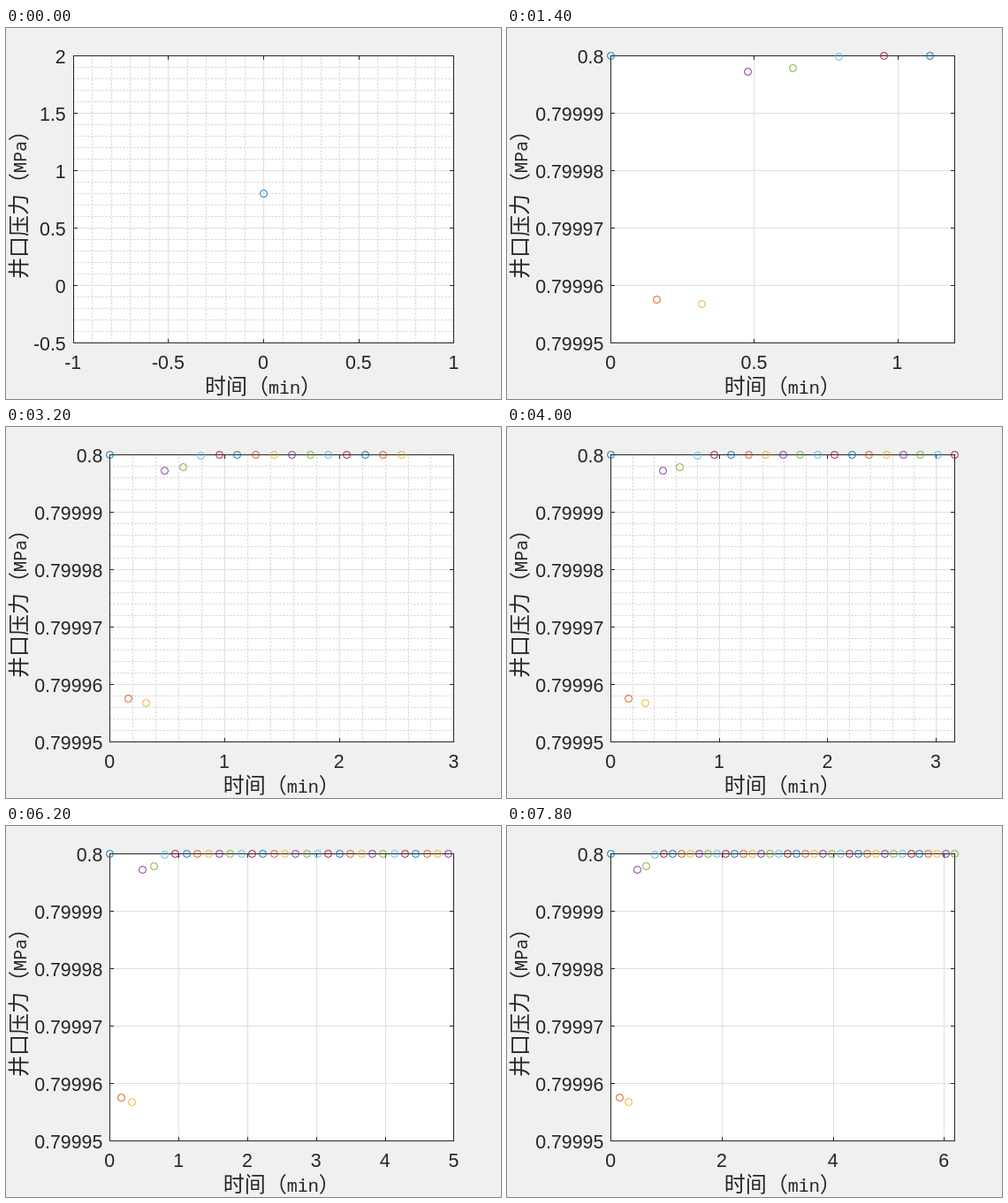
Recreate the animation shown at these times as an HTML page with a canvas. Size 560x420 px, loop 8000 ms.

```html
<!DOCTYPE html>
<html lang="zh-CN">
<head>
<meta charset="utf-8">
<title>井口压力</title>
<style>
html, body { margin: 0; width: 100%; height: 100%; overflow: hidden; background: #f0f0f0; }
canvas { display: block; }
</style>
</head>
<body>
<canvas id="stage" width="560" height="420"></canvas>
<script>
const ctx = document.getElementById('stage').getContext('2d');
const STEP_MS = 200, POINTS = 40, DT = 0.1588;
const COLORS = ['#0072bd', '#d95319', '#edb120', '#7e2f8e', '#77ac30', '#4dbeee', '#a2142f'];
const NICE = [0.02, 0.05, 0.1, 0.2, 0.5, 1, 2];
// Pressure drop below 0.8 MPa, in units of 1e-5
const DROPS = [0, 4.245, 4.316, 0.281, 0.22, 0.022, 0.007];
const TOP = 31, BOTTOM = 356.4, RIGHT = 506.4, TICK = 4.5;
const INK = '#262626', MAJOR = '#dfdfdf', MINOR = '#cfcfcf';

const pressure = i => 0.8 - (DROPS[i] || 0) * 1e-5;
const crisp = v => Math.round(v) + 0.5;
const label = v => String(+v.toFixed(5));

// Round the limit up to a tick unless that leaves too much empty room
function timeAxis(max) {
  const intervals = step => Math.ceil(max / step - 1e-9);
  const k = NICE.findIndex(step => intervals(step) <= 5);
  const step = NICE[k], rounded = intervals(step) * step;
  let hi = max;
  if (max / rounded >= 0.8) hi = rounded;
  else if (intervals(NICE[k - 1]) === 6) hi = 6 * NICE[k - 1];
  return { lo: 0, hi, step };
}

function ticks({ lo, hi, step }) {
  const list = [];
  for (let k = Math.ceil(lo / step - 1e-6); k * step <= hi + step * 1e-6; k++) list.push(k * step);
  return list;
}

function minorTicks({ lo, hi, step }) {
  const lead = Math.round(step / 10 ** Math.floor(Math.log10(step) + 1e-9));
  return ticks({ lo, hi, step: step / (lead === 2 ? 4 : 5) });
}

function line(x1, y1, x2, y2, color, dash = []) {
  ctx.strokeStyle = color;
  ctx.setLineDash(dash);
  ctx.beginPath();
  ctx.moveTo(x1, y1);
  ctx.lineTo(x2, y2);
  ctx.stroke();
}

function axisTitle(name, unit, x, y, angle) {
  const cjk = '24px "Noto Sans CJK SC", "Noto Sans CJK", sans-serif';
  const parts = [[name + '（', cjk], [unit, '20px "Noto Sans Mono", monospace'], ['）', cjk]];
  const widths = parts.map(([text, font]) => {
    ctx.font = font;
    return ctx.measureText(text).width;
  });
  ctx.save();
  ctx.translate(x, y);
  ctx.rotate(angle);
  ctx.textAlign = 'left';
  let at = -widths.reduce((a, b) => a + b) / 2;
  parts.forEach(([text, font], i) => {
    ctx.font = font;
    ctx.fillText(text, at, 0);
    at += widths[i];
  });
  ctx.restore();
}

function draw(n) {
  const left = n ? 117.3 : 75.7;
  const xAxis = n ? timeAxis(n * DT) : { lo: -1, hi: 1, step: 0.5 };
  const yAxis = n ? { lo: 0.79995, hi: 0.8, step: 1e-5 } : { lo: -0.5, hi: 2, step: 0.5 };
  const px = v => left + (v - xAxis.lo) / (xAxis.hi - xAxis.lo) * (RIGHT - left);
  const py = v => BOTTOM - (v - yAxis.lo) / (yAxis.hi - yAxis.lo) * (BOTTOM - TOP);
  const x0 = crisp(left), x1 = crisp(RIGHT), y0 = crisp(TOP), y1 = crisp(BOTTOM);
  const xTicks = ticks(xAxis), yTicks = ticks(yAxis);

  ctx.fillStyle = '#f0f0f0';
  ctx.fillRect(0, 0, 560, 420);
  ctx.fillStyle = '#fff';
  ctx.fillRect(x0, y0, x1 - x0, y1 - y0);
  ctx.lineWidth = 1;

  const grid = (xs, ys, color, dash) => {
    xs.forEach(v => line(crisp(px(v)), y1, crisp(px(v)), y0, color, dash));
    ys.forEach(v => line(x0, crisp(py(v)), x1, crisp(py(v)), color, dash));
  };
  // The minor grid toggles with every added point
  if (n % 2 === 0) grid(minorTicks(xAxis), minorTicks(yAxis), MINOR, [2, 2]);
  grid(xTicks, yTicks, MAJOR);

  ctx.setLineDash([]);
  ctx.strokeStyle = ctx.fillStyle = INK;
  ctx.strokeRect(x0, y0, x1 - x0, y1 - y0);
  ctx.font = '21.33px "Liberation Sans", Arial, sans-serif';
  ctx.textAlign = 'center';
  for (const v of xTicks) {
    const x = crisp(px(v));
    line(x, y1, x, y1 - TICK, INK);
    line(x, y0, x, y0 + TICK, INK);
    ctx.fillText(label(v), px(v), 386);
  }
  ctx.textAlign = 'right';
  for (const v of yTicks) {
    const y = crisp(py(v));
    line(x0, y, x0 + TICK, y, INK);
    line(x1, y, x1 - TICK, y, INK);
    ctx.fillText(label(v), left - 8, Math.round(py(v) + 9));
  }
  axisTitle('时间', 'min', (left + RIGHT) / 2, 414, 0);
  axisTitle('井口压力', 'MPa', 23, 194, -Math.PI / 2);

  for (let i = 0; i <= n; i++) {
    ctx.strokeStyle = COLORS[i % COLORS.length];
    ctx.beginPath();
    ctx.arc(crisp(px(i * DT)), crisp(py(pressure(i))), 4, 0, 2 * Math.PI);
    ctx.stroke();
  }
}

function tick() {
  draw(Math.floor(performance.now() / STEP_MS) % POINTS);
  requestAnimationFrame(tick);
}
tick();
</script>
</body>
</html>
```
